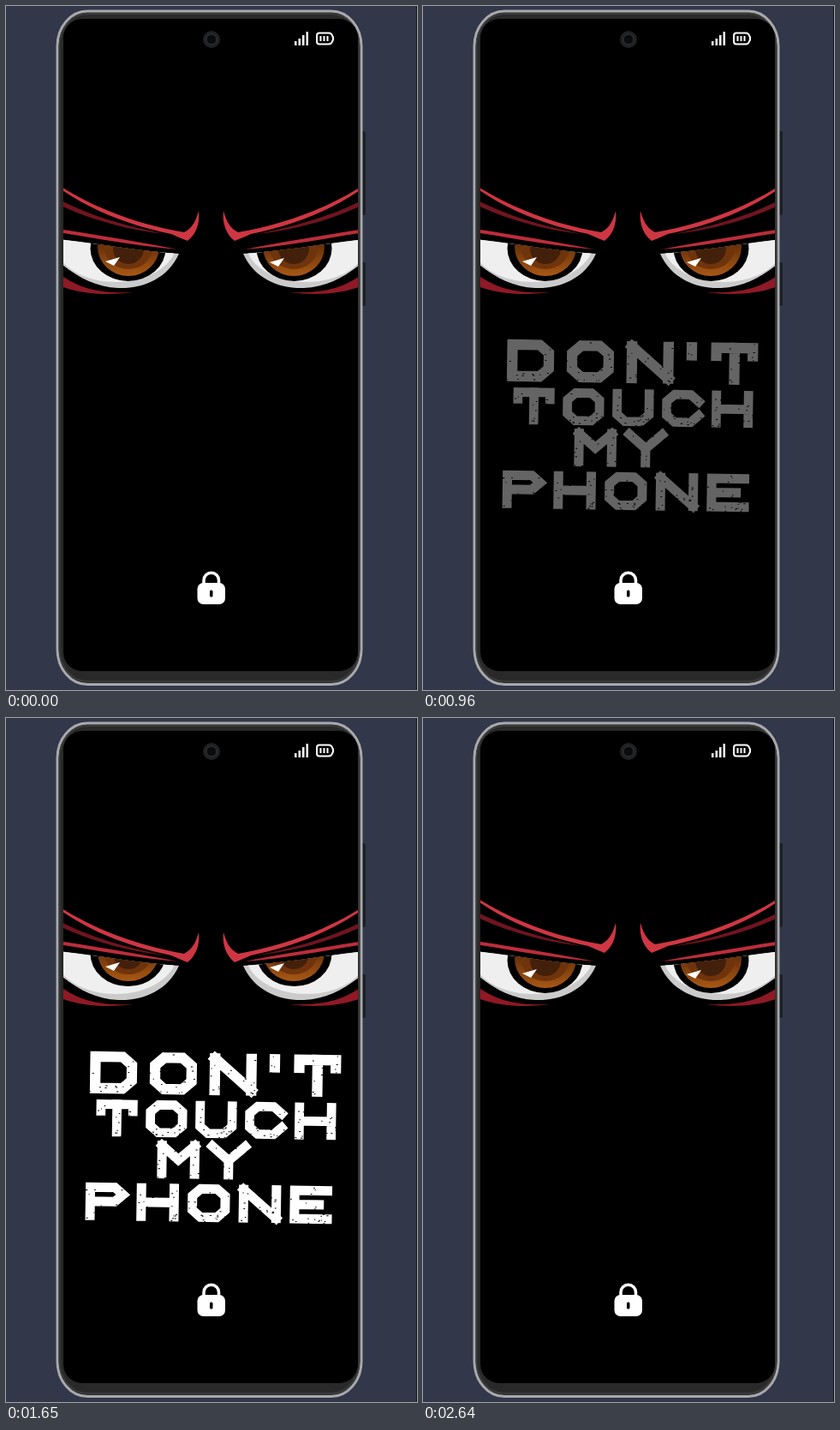
Write an HTML page that moves like this. It is 480 by 798 pixels and loops after 2700 ms.

```html
<!DOCTYPE html>
<html lang="en">
<head>
<meta charset="utf-8">
<title>Lock screen</title>
<style>
  html, body { margin: 0; height: 100%; overflow: hidden; background: #32384a; }
  svg { display: block; width: 100vw; height: 100vh; }
</style>
</head>
<body>
<svg viewBox="0 0 480 798" role="img" aria-label="Don't touch my phone">
  <defs>
    <linearGradient id="amber" x2="0" y2="1">
      <stop offset=".4" stop-color="#5f2b09"/>
      <stop offset="1" stop-color="#a85814"/>
    </linearGradient>
    <clipPath id="screen"><rect x="67" y="15" width="344" height="761" rx="22"/></clipPath>
    <clipPath id="opening">
      <path id="white" d="M60 272C105 277 155 286 202 289C189 318 160 330 131 329C103 328 80 314 60 297Z"/>
    </clipPath>

    <g id="side">
      <path fill="#8f1925" d="M60 311C88 332 112 335 148 334C116 338 84 336 60 325Z"/>
      <use href="#white" fill="#cbcbcb"/>
      <g clip-path="url(#opening)">
        <ellipse cx="128" cy="276" rx="71" ry="46" fill="#efefef"/>
        <g id="iris">
          <ellipse cx="142.500" cy="283" rx="44" ry="38"/>
          <ellipse cx="143" cy="281" rx="36" ry="34" fill="url(#amber)"/>
          <ellipse cx="143" cy="282" rx="28" ry="25" fill="#6f340b"/>
          <ellipse cx="143" cy="283" rx="18" ry="18" fill="#43200b"/>
        </g>
      </g>
      <path fill="#bd2d3b" d="M60 260C105 267 155 275 200 284C150 280 105 271 60 264Z"/>
      <g id="brow">
        <path fill="#701420" d="M60 225C100 246 145 258 186 266C140 261 98 249 60 231Z"/>
        <path fill="#cf3643" d="M60 208C106 238 160 256 208 264C218 259 222 250 225 239C227 256 220 268 212 274C205 271 199 269 193 266C145 256 101 240 60 211Z"/>
      </g>
    </g>
    <path id="glint" fill="#fff" d="M116 298L133 293L126 303Z"/>
  </defs>

  <rect width="480" height="798" fill="#32384a"/>
  <path fill="#14171e" d="M479 0h1v798h-1z"/>
  <path fill="#1b1e24" d="M414 146h4q2 0 2 3v92q0 3-2 3h-4zM414 299h4q2 0 2 3v45q0 3-2 3h-4z"/>
  <rect x="60" y="6" width="355" height="785.500" rx="35" ry="41" fill="#292929" stroke="#a8a9ab" stroke-width="3"/>
  <rect x="62.500" y="9" width="350" height="779" rx="32" ry="38" fill="none" stroke="#3b3b3b" stroke-width="2"/>
  <rect x="67" y="15" width="344" height="761" rx="22"/>

  <g clip-path="url(#screen)">
    <use href="#side"/>
    <use href="#side" transform="matrix(-1 0 0 1 479 0)"/>
    <g id="glints"><use href="#glint"/><use href="#glint" x="192" y="1"/></g>
    <g id="mouth">
      <path fill="#a5a4a5" d="M128 376C165 380 195 386 240 387C285 386 317 383 348 379L345 391C312 399 278 401 240 400C200 400 166 394 141 391Z"/>
      <path fill="#f5f5f5" d="M150 386L157 380L173 385ZM187 390L197 384L208 391ZM202 385L240 387L219 395ZM230 393L245 387L257 394ZM260 387L290 385L275 391ZM281 391L310 384L307 390ZM317 387L342 380L332 387Z"/>
      <path fill="#5e111a" d="M173 388L180 384L186 388L179 392Z"/>
    </g>
    <g id="slogan" fill="none" stroke="#fff" stroke-linecap="square"></g>
  </g>

  <circle cx="240" cy="39" r="10" fill="#202123"/>
  <circle cx="240" cy="39" r="6" fill="#0b0c0e" stroke="#35373a"/>
  <path fill="#fff" d="M337 41h2.500v5h-2.500zM341.500 38h2.500v8h-2.500zM346 34h2.500v12h-2.500zM350.500 30h2.500v16h-2.500z"/>
  <path fill="none" stroke="#fff" stroke-width="2" d="M366 31.500h11q3 0 4 3l1 2v3l-1 2q-1 3-4 3h-11q-3 0-3-3v-7q0-3 3-3zM367.500 35v6M371.500 35v6M375.500 35v6"/>
  <path fill="none" stroke="#fff" stroke-width="3.500" d="M231 676v-6a8.500 8.500 0 0 1 17.500 0v6"/>
  <rect x="223.500" y="673" width="32.500" height="25" rx="7" fill="#fff"/>
  <rect x="238" y="681.500" width="3.500" height="8" rx="1.500"/>
</svg>
<script>
const LOOP = 2700;
const $ = id => document.getElementById(id);

// Strokes on a 5 x 5 grid named a to y, row by row; z closes a stroke.
const glyphs = {
  D: "adjtxuz", O: "bdjtxvpfz", N: "au ay ey", "'": "af", T: "faej cw", U: "apvxte",
  C: "jdbfpvxt", H: "au ey ko", M: "au ey ame", Y: "ame mw", P: "uadjnk", E: "eauy kn"
};

let seed = 7;
const random = () => (seed = seed * 16807 % 2147483647) / 2147483647;

function drawLetter(char, left, top, width, height) {
  const weight = height * .25;
  const place = key => {
    if (key === "z") return "Z";
    const cell = key.charCodeAt(0) - 97;
    const x = left + weight / 2 + (cell % 5) / 4 * (width - weight);
    const y = top + weight / 2 + Math.floor(cell / 5) / 4 * (height - weight);
    return `L${x} ${y}`;
  };
  const d = glyphs[char].split(" ")
    .map(stroke => [...stroke].map(place).join("").replace("L", "M")).join("");
  let specks = "";
  for (let i = 0; i < 24; i++) {
    const x = left + random() * width;
    const y = top + height * Math.sqrt(random());
    specks += `M${x} ${y}h${random() * 1.5}`;
  }
  return `<path d="${d}" stroke-width="${weight}"/><path d="${specks}" stroke="#000"/>`;
}

// Letters of one height share a width; the gaps fill the line.
function drawLine(word, left, right, top, height) {
  const widthOf = char => height * (char === "'" ? .28 : 1.12);
  const letters = [...word];
  const inked = letters.reduce((sum, char) => sum + widthOf(char), 0);
  const gap = (right - left - inked) / (letters.length - 1);
  let x = left;
  return letters.map(char => {
    const shape = drawLetter(char, x, top, widthOf(char), height);
    x += widthOf(char) + gap;
    return shape;
  }).join("");
}

$("slogan").innerHTML =
  drawLine("DON'T", 97, 390, 391, 49) +
  drawLine("TOUCH", 105, 385, 447, 43) +
  drawLine("MY", 177, 285, 494, 44) +
  drawLine("PHONE", 94, 382, 544, 44);

function ramp(t, start, end) {
  const x = Math.min(1, Math.max(0, (t - start) / (end - start)));
  return x * x * (3 - 2 * x);
}
// Eases from 0 to 1, holds, then eases back.
const pulse = (t, rise, top, fall, end) => ramp(t, rise, top) - ramp(t, fall, end);

function frame(now) {
  const t = now % LOOP;
  const frown = pulse(t, 1200, 1680, 1880, 2500);
  const grin = pulse(t, 400, 570, 690, 840);
  const tilt = .9 + 4.4 * pulse(t, 1890, 2070, 2070, 2250);
  const move = (id, transform) => $(id).setAttribute("transform", transform);
  move("brow", `translate(0 ${11 * frown})`);
  move("iris", `translate(0 ${-8 * frown})`);
  move("glints", `translate(0 ${-8 * frown})`);
  move("mouth", `translate(0 ${388 * (1 - grin)}) scale(1 ${grin})`);
  move("slogan", `rotate(${tilt} 240 490)`);
  $("slogan").setAttribute("opacity", pulse(t, 850, 1110, 2300, 2480));
  requestAnimationFrame(frame);
}
frame(performance.now());
</script>
</body>
</html>
```
